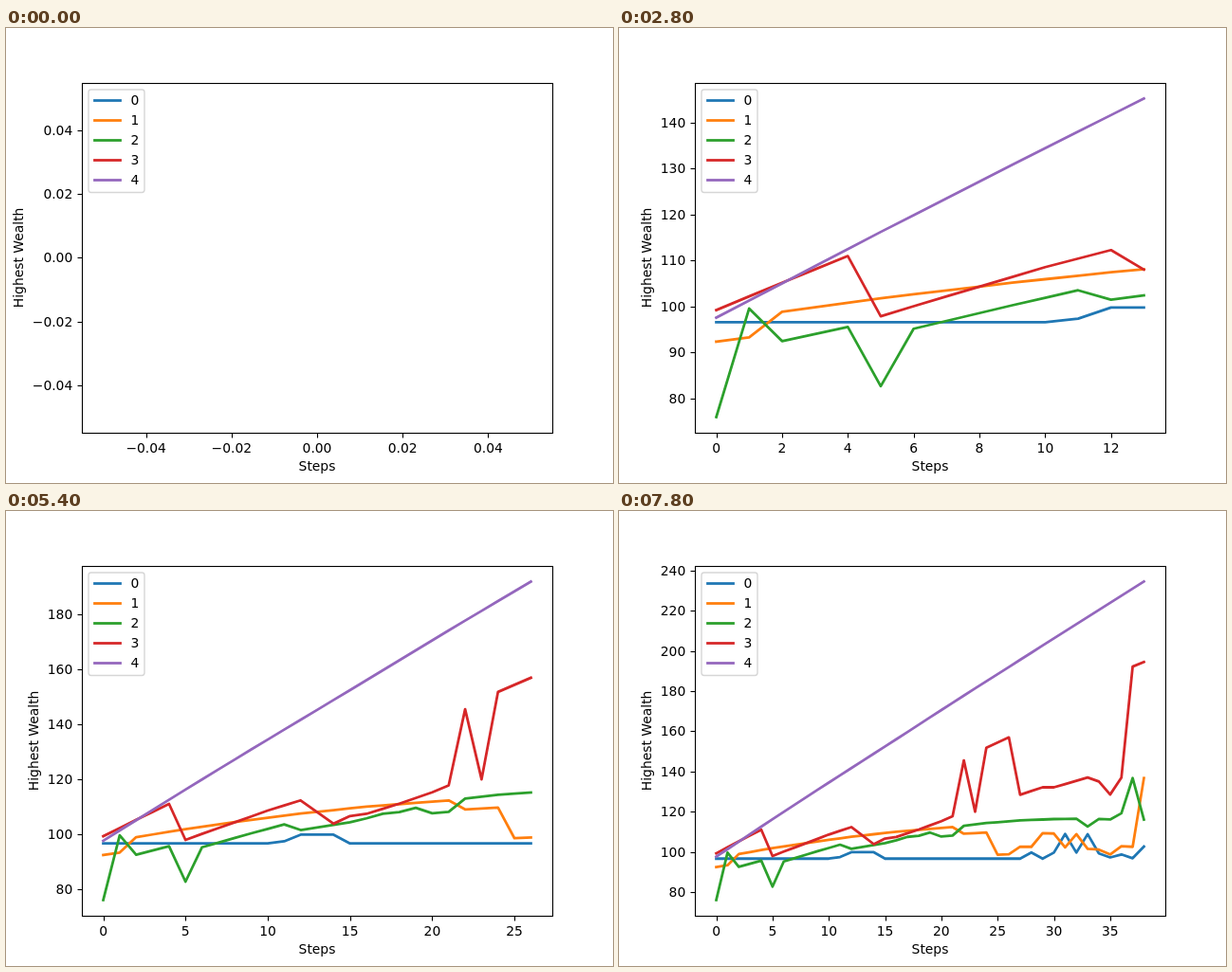
An HTML page with a canvas that plays this animation: 640x480 px, repeating every 8000 ms.

```html
<!DOCTYPE html>
<html lang="en">
<head>
<meta charset="utf-8">
<title>Highest Wealth</title>
<style>
  html, body { margin: 0; width: 100%; height: 100%; overflow: hidden; background: #fff; }
  canvas { display: block; }
</style>
</head>
<body>
<canvas id="chart" width="640" height="480"></canvas>
<script>
const LOOP = 8000, STEP_TIME = 200;
const PT = 100 / 72; // pixels per point
const BOX = { left: 80, right: 576, top: 57.6, bottom: 427.2 };
const ctx = document.getElementById('chart').getContext('2d');

// One value per step; blanks lie on a straight line between their neighbours.
let _;
const series = [
  { color: '#1f77b4', values: [
    96.6, _, _, _, _, _, _, _, _, _,
    96.6, 97.4, 99.8, _, 99.8, 96.6, _, _, _, _,
    _, _, _, _, _, _, _, 96.6, 99.7, 96.6,
    99.6, 108.9, 99.6, 108.8, 99.2, 97.2, 98.7, 96.8, 102.6] },
  { color: '#ff7f0e', values: [
    92.4, 93.3, 98.9, _, 100.85, 101.8, 102.7, _, _, 105.2,
    _, _, 107.5, _, _, _, 110, _, _, _,
    _, 112.3, 109, _, 109.65, 98.5, 98.8, 102.6, 102.5, 109.25,
    109.1, 102.2, 108.8, 101.5, 101.1, 98.7, 102.8, 102.5, 136.7] },
  { color: '#2ca02c', values: [
    76, 99.6, 92.5, _, 95.6, 82.7, 95.2, _, _, 100.3,
    _, 103.55, 101.5, _, 103.4, 104.3, 105.75, 107.45, 108, 109.6,
    107.6, 108.1, 112.95, _, 114.3, _, _, 115.6, _, _,
    116.3, _, 116.5, 112.6, 116.35, 116.1, 119.2, 136.7, 116] },
  { color: '#d62728', values: [
    99.25, _, 105.2, _, 111, 97.9, 100.1, _, _, 106.45,
    108.6, _, 112.3, _, 103.8, 106.6, 107.4, _, 111.1, _,
    115.25, 117.75, 145.5, 119.95, 151.8, _, 156.95, 128.4, _, 132.1,
    132.1, _, _, 137, 135, 128.5, 136.9, 192.2, 194.5] },
  { color: '#9467bd', values: [
    97.6, _, _, _, _, 116.25, _, _, _, 130.85,
    _, _, _, _, _, _, 156.05, _, _, _,
    _, 174.2, _, _, _, _, _, _, _, _,
    206.25, _, _, _, _, _, _, _, 234.55] },
];
series.forEach(s => fillBlanks(s.values));

function fillBlanks(values) {
  let from = 0;
  for (let i = 1; i < values.length; i++) {
    if (values[i] === undefined) continue;
    const slope = (values[i] - values[from]) / (i - from);
    for (let k = from + 1; k < i; k++) values[k] = values[from] + slope * (k - from);
    from = i;
  }
}

// Data range plus a 5% margin on both sides.
function limits(values) {
  let min = Math.min(...values), max = Math.max(...values);
  if (!values.length || min === max) { min = -0.05; max = 0.05; }
  const margin = (max - min) * 0.05;
  return { min: min - margin, max: max + margin };
}

// Round tick values, at most nine intervals.
function ticks({ min, max }) {
  const raw = (max - min) / 9;
  const scale = 10 ** Math.floor(Math.log10(raw));
  const factor = [1, 2, 2.5, 5, 10].find(f => f * scale >= raw);
  const step = factor * scale;
  const decimals = Math.max(0, -Math.round(Math.log10(scale)) +
    (factor === 2.5 ? 1 : factor === 10 ? -1 : 0));
  const list = [];
  for (let i = Math.ceil(min / step); i * step <= max; i++) {
    const label = Math.abs(i * step).toFixed(decimals);
    list.push({ value: i * step, label: (i < 0 ? '\u2212' : '') + label });
  }
  return list;
}

const snap = v => Math.floor(v + 0.5) + 0.5;

function line(x1, y1, x2, y2) {
  ctx.beginPath();
  ctx.moveTo(x1, y1);
  ctx.lineTo(x2, y2);
  ctx.stroke();
}

function text(label, x, y, align) {
  ctx.textAlign = align;
  ctx.fillText(label, x, y);
}

function thinStroke() {
  ctx.strokeStyle = '#000';
  ctx.lineWidth = 0.8 * PT;
  ctx.lineCap = 'butt';
}

function thickStroke(color) {
  ctx.strokeStyle = color;
  ctx.lineWidth = 2 * PT;
  ctx.lineCap = 'square';
  ctx.lineJoin = 'round';
}

function drawAxes(xTicks, yTicks, toX, toY) {
  const { left, right, top, bottom } = BOX;
  thinStroke();
  ctx.fillStyle = '#000';
  for (const { value, label } of xTicks) {
    const x = toX(value);
    line(snap(x), 427.5, snap(x), 432.5);
    text(label, x, 448, 'center');
  }
  let widest = 0;
  for (const { value, label } of yTicks) {
    const y = toY(value);
    line(75.5, snap(y), 80.5, snap(y));
    text(label, left - 7 * PT, Math.round(y + 5), 'right');
    widest = Math.max(widest, ctx.measureText(label).width);
  }
  ctx.lineJoin = 'miter';
  ctx.strokeRect(snap(left), snap(top), right - left, snap(bottom) - snap(top));

  text('Steps', 328, 467, 'center');
  ctx.save();
  ctx.translate(Math.round(left - 7 * PT - widest - 9.8), 242.4);
  ctx.rotate(-Math.PI / 2);
  text('Highest Wealth', 0, 0, 'center');
  ctx.restore();
}

function drawSeries(count, toX, toY) {
  const { left, right, top, bottom } = BOX;
  ctx.save();
  ctx.beginPath();
  ctx.rect(left, top, right - left, bottom - top);
  ctx.clip();
  for (const { color, values } of series) {
    thickStroke(color);
    ctx.beginPath();
    values.slice(0, count).forEach((v, i) => ctx.lineTo(toX(i), toY(v)));
    if (count > 1) ctx.stroke();
  }
  ctx.restore();
}

function drawLegend() {
  ctx.beginPath();
  ctx.roundRect(87, 65, 59, 108.5, 2.8);
  ctx.fillStyle = 'rgba(255, 255, 255, 0.8)';
  ctx.fill();
  ctx.strokeStyle = 'rgba(204, 204, 204, 0.8)';
  ctx.lineWidth = PT;
  ctx.stroke();
  ctx.fillStyle = '#000';
  series.forEach(({ color }, i) => {
    const y = 76.5 + 21 * i;
    thickStroke(color);
    line(93.5, y, 120.5, y);
    text(i, 131.4, y + 4.5, 'left');
  });
}

function draw(count) {
  const { left, right, top, bottom } = BOX;
  const shown = series.flatMap(s => s.values.slice(0, count));
  const xLim = limits(count ? [0, count - 1] : []);
  const yLim = limits(shown);
  const toX = v => left + (right - left) * (v - xLim.min) / (xLim.max - xLim.min);
  const toY = v => bottom - (bottom - top) * (v - yLim.min) / (yLim.max - yLim.min);

  ctx.fillStyle = '#fff';
  ctx.fillRect(0, 0, 640, 480);
  ctx.font = `${10 * PT}px "DejaVu Sans", sans-serif`;
  drawSeries(count, toX, toY);
  drawAxes(ticks(xLim), ticks(yLim), toX, toY);
  drawLegend();
}

function frame() {
  draw(Math.floor(performance.now() % LOOP / STEP_TIME));
  requestAnimationFrame(frame);
}
frame();
</script>
</body>
</html>
```
